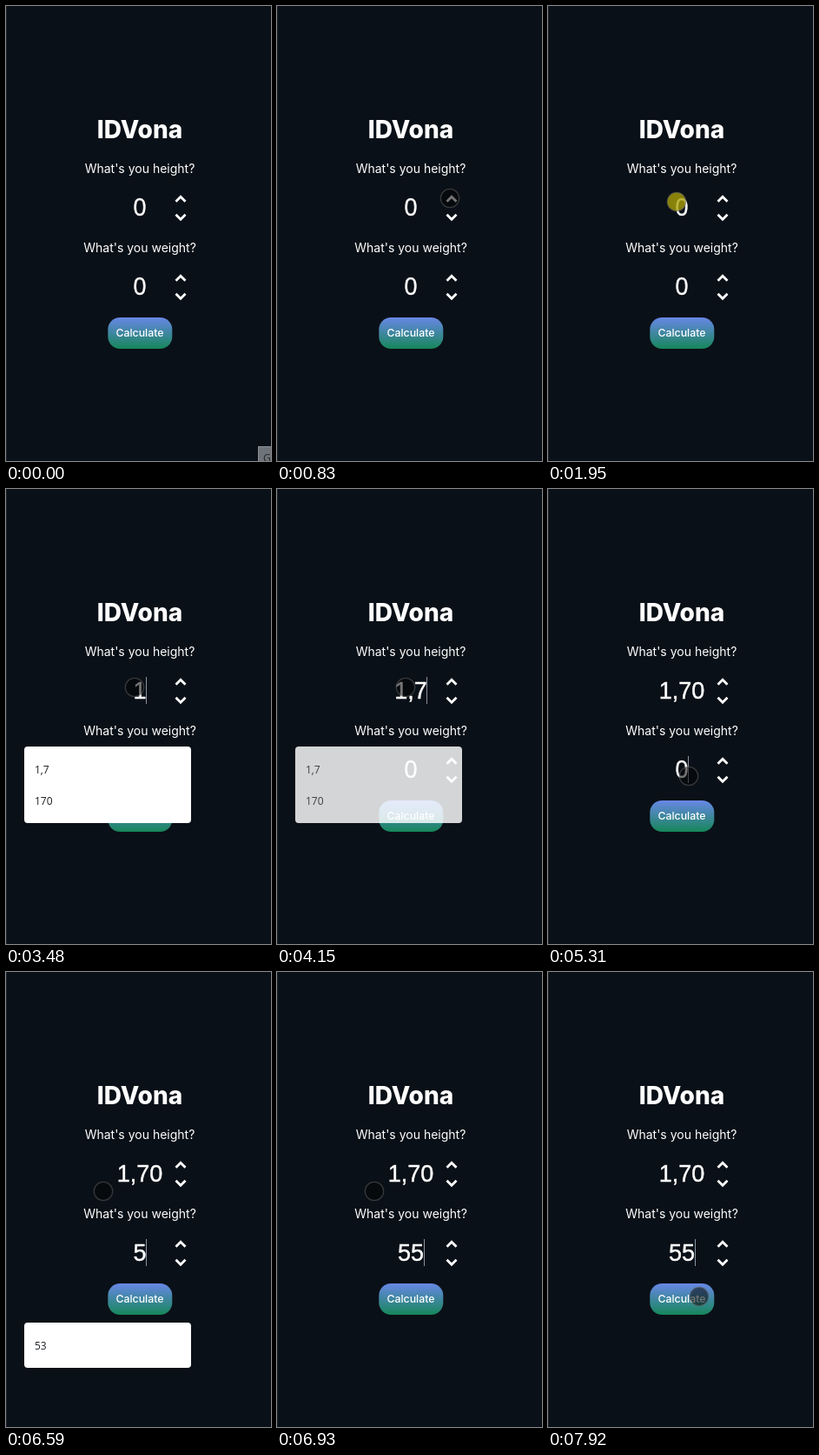
An HTML page with a canvas that plays this animation: 305x523 px, repeating every 8 s.

```html
<!DOCTYPE html>
<html lang="en">
<head>
<meta charset="utf-8">
<title>IDVona</title>
<style>
html, body { margin: 0; width: 100%; height: 100%; overflow: hidden; background: #0a1017; }
canvas { display: block; width: 305px; height: 523px; }
</style>
</head>
<body>
<canvas id="stage"></canvas>
<script>
const W = 305, H = 523, LOOP = 8000, MID = 154;
const canvas = document.getElementById('stage');
const ctx = canvas.getContext('2d');
const dpr = window.devicePixelRatio || 1;
canvas.width = W * dpr;
canvas.height = H * dpr;

const UI = 'Inter, sans-serif';
const FIELD = '"Liberation Sans", Arial, sans-serif';
const HINT = '"Open Sans", sans-serif';

// pointer path: time, x, y
const path = [
  [30, 320, 528], [520, 131, 195], [830, 199, 221], [930, 199, 221],
  [1280, 162, 224], [1440, 162, 224], [1590, 163, 235], [1820, 163, 235],
  [1950, 148, 225], [2180, 148, 225], [2440, 165, 230], [2610, 165, 230],
  [2640, 148, 228], [4840, 148, 228], [5200, 165, 338], [5310, 162, 330],
  [5590, 162, 330], [5810, 112, 252], [7230, 112, 252], [7330, 110, 254],
  [7920, 174, 373]
];
// typed values: time, text
const height = [[0, '0'], [3090, ''], [3480, '1'], [3730, '1,'], [4090, '1,7'], [4290, '1,70']];
const weight = [[0, '0'], [6040, ''], [6550, '5'], [6750, '55']];
// caret visible: from, to
const heightCaret = [[2180, 2920], [3090, 4840]];
const weightCaret = [[5310, 7430], [7900, 8000]];
const presses = [[1910, 2180], [5230, 5310]];

const within = (spans, t) => spans.some(([a, b]) => t >= a && t < b);
const clamp = v => Math.max(0, Math.min(1, v));
const ease = v => v * v * (3 - 2 * v);

function valueAt(list, t) {
  let v = list[0][1];
  for (const [at, text] of list) if (t >= at) v = text;
  return v;
}

function pointerAt(t) {
  let a = path[0];
  for (const b of path) {
    if (t < b[0]) {
      const k = ease(clamp((t - a[0]) / (b[0] - a[0] || 1)));
      return [a[1] + (b[1] - a[1]) * k, a[2] + (b[2] - a[2]) * k];
    }
    a = b;
  }
  return [a[1], a[2]];
}

function label(text, x, y, font, color = '#fff', align = 'center') {
  ctx.font = font;
  ctx.fillStyle = color;
  ctx.textAlign = align;
  ctx.fillText(text, x, y);
}

function panel(x, y, w, h, r, fill) {
  ctx.fillStyle = fill;
  ctx.beginPath();
  ctx.roundRect(x, y, w, h, r);
  ctx.fill();
}

function chevron(y, dir) {
  ctx.strokeStyle = '#fff';
  ctx.lineWidth = 2.8;
  ctx.beginPath();
  ctx.moveTo(195.5, y + 2.8 * dir);
  ctx.lineTo(201, y - 2.8 * dir);
  ctx.lineTo(206.5, y + 2.8 * dir);
  ctx.stroke();
}

function field(text, base, caret) {
  label(text, MID, base, '27px ' + (text === '0' ? HINT : FIELD));
  // slightly heavier digits
  ctx.strokeStyle = '#fff';
  ctx.lineWidth = 0.45;
  ctx.strokeText(text, MID, base);
  if (!caret) return;
  const x = Math.floor(MID + ctx.measureText(text).width / 2);
  ctx.fillStyle = '#8795a3';
  ctx.fillRect(x, base - 25, 1, 31);
}

function button() {
  const g = ctx.createLinearGradient(0, 358, 0, 394);
  g.addColorStop(0, '#6887e6');
  g.addColorStop(1, '#16875a');
  panel(117.3, 358, 74, 36, 14, g);
  label('Calculate', MID, 380, '500 12.3px ' + UI);
}

function suggestions(items, y, h, alpha) {
  if (alpha <= 0) return;
  ctx.globalAlpha = alpha;
  panel(21, y, 192, h, 4, '#fff');
  items.forEach((s, i) => label(s, 33, y + 31 + 36 * i, '12px ' + HINT, '#1c2126', 'left'));
  ctx.globalAlpha = 1;
}

function tooltip(alpha) {
  if (alpha <= 0) return;
  ctx.globalAlpha = alpha;
  ctx.fillStyle = '#8b9095';
  ctx.fillRect(290, 506, 15, 17);
  ctx.fillStyle = '#6d7379';
  ctx.fillRect(291, 507, 14, 16);
  label('G', 296, 524, '12px ' + HINT, '#22272c', 'left');
  ctx.globalAlpha = 1;
}

function pointer(t) {
  const [x, y] = pointerAt(t);
  ctx.beginPath();
  ctx.arc(x, y, 10.7, 0, Math.PI * 2);
  ctx.fillStyle = within(presses, t) ? 'rgba(172,163,8,.78)' : 'rgba(6,6,6,.55)';
  ctx.fill();
  ctx.strokeStyle = 'rgba(100,100,100,.5)';
  ctx.lineWidth = 1.3;
  ctx.stroke();
}

function draw(t) {
  ctx.setTransform(dpr, 0, 0, dpr, 0, 0);
  ctx.fillStyle = '#0a1017';
  ctx.fillRect(0, 0, W, H);
  ctx.fillStyle = '#20262d';
  ctx.fillRect(0, 0, 1, H);

  label('IDVona', MID, 152, '800 28px ' + UI);
  label("What's you height?", MID, 192, '14px ' + UI);
  label("What's you weight?", MID, 283, '14px ' + UI);
  for (const dy of [0, 91]) {
    chevron(222 + dy, 1);
    chevron(242.5 + dy, -1);
  }
  field(valueAt(height, t), 241, within(heightCaret, t));
  field(valueAt(weight, t), 332, within(weightCaret, t));
  button();

  if (t >= 3480) suggestions(['1,7', '170'], 296, 88, 1 - clamp((t - 4110) / 230));
  if (t >= 6550) suggestions(['53'], 403, 52, clamp((t - 6510) / 80) - clamp((t - 6760) / 165));
  tooltip(1 - clamp((t - 30) / 120));
  pointer(t);
}

const start = performance.now();
function tick() {
  draw((performance.now() - start) % LOOP);
  requestAnimationFrame(tick);
}
tick();
</script>
</body>
</html>
```
